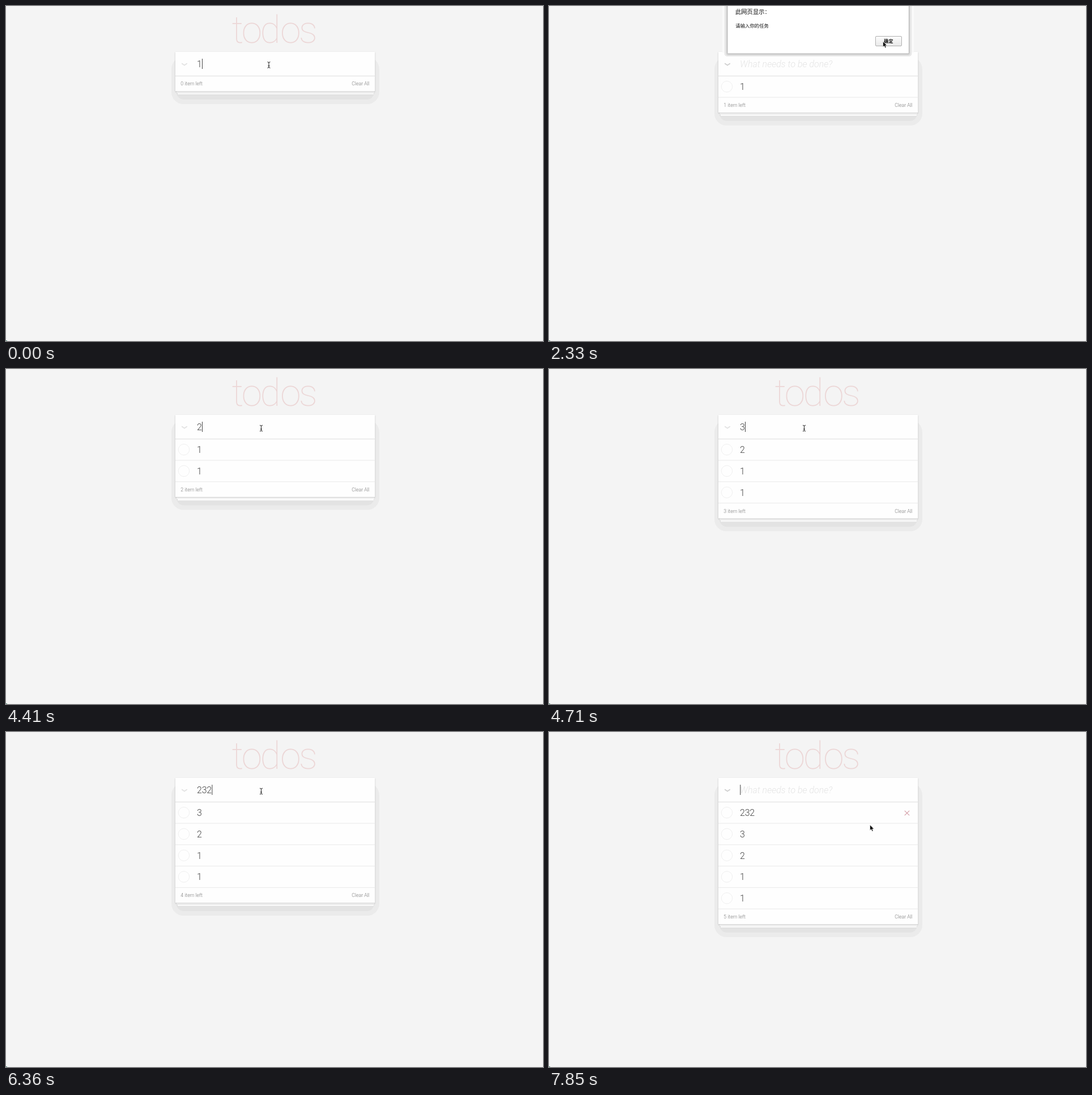
Recreate the animation shown at these times as an HTML page. Size 948 by 591 pixels, loop 8 s.

```html
<!DOCTYPE html>
<html lang="en">
<head>
<meta charset="utf-8">
<title>todos</title>
<style>
  html, body { margin: 0; width: 100%; height: 100%; overflow: hidden; background: #f4f4f4; }
  svg { display: block; width: 948px; height: 591px; }
  text { font-family: Roboto, "Liberation Sans", sans-serif; font-weight: 300; }
  .title { font-size: 66px; font-weight: 100; fill: #ecd6d6; text-anchor: middle; }
  .entry { font-size: 16px; letter-spacing: -.25px; fill: #444; }
  .hint { font-size: 16px; font-style: italic; fill: #e4e4e4; }
  .foot { font-size: 8.8px; fill: #777; }
  .sheet text { font-family: "Noto Sans CJK SC", "Noto Sans CJK", sans-serif; font-weight: 500; fill: #111; }
  .card { fill: #fefefe; filter: drop-shadow(0 1px 1.3px rgba(0,0,0,.22)); }
  .paper { fill: #fafafa; filter: drop-shadow(0 .7px .6px rgba(0,0,0,.28)); }
  .ring { fill: none; stroke: #ebebeb; stroke-width: .8; }
  .cross { fill: none; stroke: #d39aa3; stroke-width: 1.1; }
</style>
</head>
<body>
<svg viewBox="0 0 948 591">
  <rect y="590" width="2" height="1" fill="#4a8a76"/>
  <text class="title" x="409 434 466.5 502.5 533.5" y="65">todos</text>

  <rect class="grow" x="292" y="90" width="367" height="83" rx="21" fill="#ebebeb"/>
  <rect class="grow" x="301" y="100" width="349" height="65" rx="13" fill="#e3e3e3"/>
  <rect class="paper grow" x="302.5" y="90" width="346.5" height="66.5"/>
  <rect class="paper grow" x="300.7" y="90" width="350" height="63.5"/>
  <rect class="card grow" x="299" y="81" width="352.3" height="69.3"/>

  <path id="chevron" d="M310.2 101.2 L315 104.4 L319.8 101.2" fill="none" stroke-width="1.8"/>
  <text id="hint" class="hint" x="337" y="108">What needs to be done?</text>
  <text id="input" class="entry" x="337" y="108"></text>
  <rect id="caret" y="93" width="1" height="18" fill="#444"/>
  <rect x="299" y="123" width="352.3" height="1" fill="#dfdfdf"/>
  <g id="rows"></g>
  <g id="footer">
    <text id="left" class="foot" x="308.3" y="140.3"></text>
    <text class="foot" x="641.8" y="140.3" text-anchor="end">Clear All</text>
  </g>

  <g id="sheet" class="sheet">
    <rect x="306" y="-5" width="338" height="87" fill="#fafafa"/>
    <rect x="309.5" y="-8" width="331" height="97" rx="5" fill="#e9e9e9"/>
    <rect x="312.5" y="-8" width="325" height="95" rx="4" fill="#d5d5d5"/>
    <rect x="315" y="-8" width="320.5" height="92" rx="1.5" fill="#fff" stroke="#a6a6a6" stroke-width=".8"/>
    <text x="329" y="14.2" font-size="10.3">此网页显示：</text>
    <text x="329.3" y="38.4" font-size="8.4">请输入你的任务</text>
    <linearGradient id="button" x2="0" y2="1">
      <stop stop-color="#fdfdfd"/><stop offset="1" stop-color="#e9e9e9"/>
    </linearGradient>
    <rect x="576.5" y="53.5" width="46" height="17" rx="1.5" fill="url(#button)" stroke="#a8a8a8" stroke-width=".9"/>
    <text x="599.4" y="65.2" font-size="8.1" text-anchor="middle" style="font-weight:700">确定</text>
  </g>

  <path id="beam" d="M-2.5 -5.3 Q0 -5.3 0 -3.5 V3.5 Q0 5.3 -2.5 5.3 M2.5 -5.3 Q0 -5.3 0 -3.5 M0 3.5 Q0 5.3 2.5 5.3 M-1.5 1.6 H1.5"
        fill="none" stroke="#222" stroke-width="1"/>
  <path id="arrow" d="M0 0 V9.6 L2.2 7.6 L3.8 11.2 L5.5 10.4 L3.9 7 H6.9 Z" fill="#000" stroke="#fff" stroke-width=".6"/>
</svg>
<script>
const LOOP = 8000, PITCH = 37.75;
const added = ['1', '1', '2', '3', '232'];
const $ = id => document.getElementById(id);

// Each step changes only the listed parts of the state.
const steps = [
  [0,    { text: '1', caret: 1, count: 0, sheet: 0, hover: -1, arrow: 0, at: [464, 104] }],
  [150,  { caret: 0 }],
  [690,  { text: '', caret: 1, count: 1 }],
  [1140, { caret: 0 }],
  [1290, { arrow: 1, at: [463.5, 103] }],
  [1440, { sheet: 1 }],
  [1590, { at: [475, 100] }],
  [1740, { at: [510, 88] }],
  [1890, { at: [555, 72] }],
  [2030, { at: [588, 61] }],
  [2180, { at: [600, 58.5] }],
  [2330, { at: [589.7, 62.7] }],
  [2630, { sheet: 0 }],
  [2780, { at: [530, 84] }],
  [2920, { arrow: 0, at: [450.5, 104.5], caret: 1 }],
  [3370, { caret: 0 }],
  [3660, { text: '1', caret: 1 }],
  [3810, { text: '', count: 2 }],
  [4410, { text: '2' }],
  [4560, { text: '', count: 3 }],
  [4710, { text: '3' }],
  [4860, { text: '', count: 4 }],
  [5010, { arrow: 1, at: [450, 103.5], caret: 0 }],
  [5160, { sheet: 1 }],
  [5460, { sheet: 0, arrow: 0, at: [450.5, 104.5], caret: 1 }],
  [6060, { text: '2' }],
  [6210, { text: '23' }],
  [6360, { text: '232' }],
  [6510, { text: '', count: 5 }],
  [6960, { caret: 0 }],
  [7110, { arrow: 1, at: [478, 128], hover: 0 }],
  [7260, { at: [525, 150] }],
  [7410, { at: [560, 172], hover: 1, caret: 1 }],
  [7550, { at: [566, 168] }],
  [7700, { at: [567, 160], hover: 0 }],
  [7850, { at: [566.7, 164] }]
];
let last = {};
const states = steps.map(([time, change]) => (last = { ...last, ...change, time }));

$('rows').innerHTML = added.map((_, i) => `
  <g transform="translate(0 ${i * PITCH})">
    <circle class="ring" cx="314" cy="142.2" r="9.7"/>
    <text class="entry" x="337" y="148.2"></text>
    <path class="cross" d="M627.8 138.8 l8.4 8.4 m0 -8.4 l-8.4 8.4"/>
    <rect x="299" y="160.6" width="352.3" height="1" fill="#e9e9e9"/>
  </g>`).join('');
const rows = [...$('rows').children];
const growing = [...document.querySelectorAll('.grow')].map(el => [el, +el.getAttribute('height')]);

const show = (el, on) => { el.style.display = on ? '' : 'none'; };
const move = (el, x, y) => el.setAttribute('transform', `translate(${x} ${y})`);

function render({ text, caret, count, sheet, hover, arrow, at }) {
  const extra = count * PITCH;
  growing.forEach(([el, height]) => el.setAttribute('height', height + extra));
  move($('footer'), 0, extra);
  $('left').textContent = `${count} item left`;
  $('input').textContent = text;
  show($('hint'), !text);
  $('chevron').setAttribute('stroke', text ? '#e2e2e2' : '#cecece');
  show($('caret'), caret);
  $('caret').setAttribute('x', 337.3 + 8.7 * text.length);
  rows.forEach((row, i) => {
    show(row, i < count);
    row.querySelector('text').textContent = added[count - 1 - i] || '';
    show(row.querySelector('.cross'), i === hover);
  });
  show($('sheet'), sheet);
  show($('arrow'), arrow);
  show($('beam'), !arrow);
  move($(arrow ? 'arrow' : 'beam'), ...at);
}

let current;
function tick() {
  const t = performance.now() % LOOP;
  const state = states.findLast(s => s.time <= t);
  if (state !== current) render(current = state);
  requestAnimationFrame(tick);
}
tick();
</script>
</body>
</html>
```
